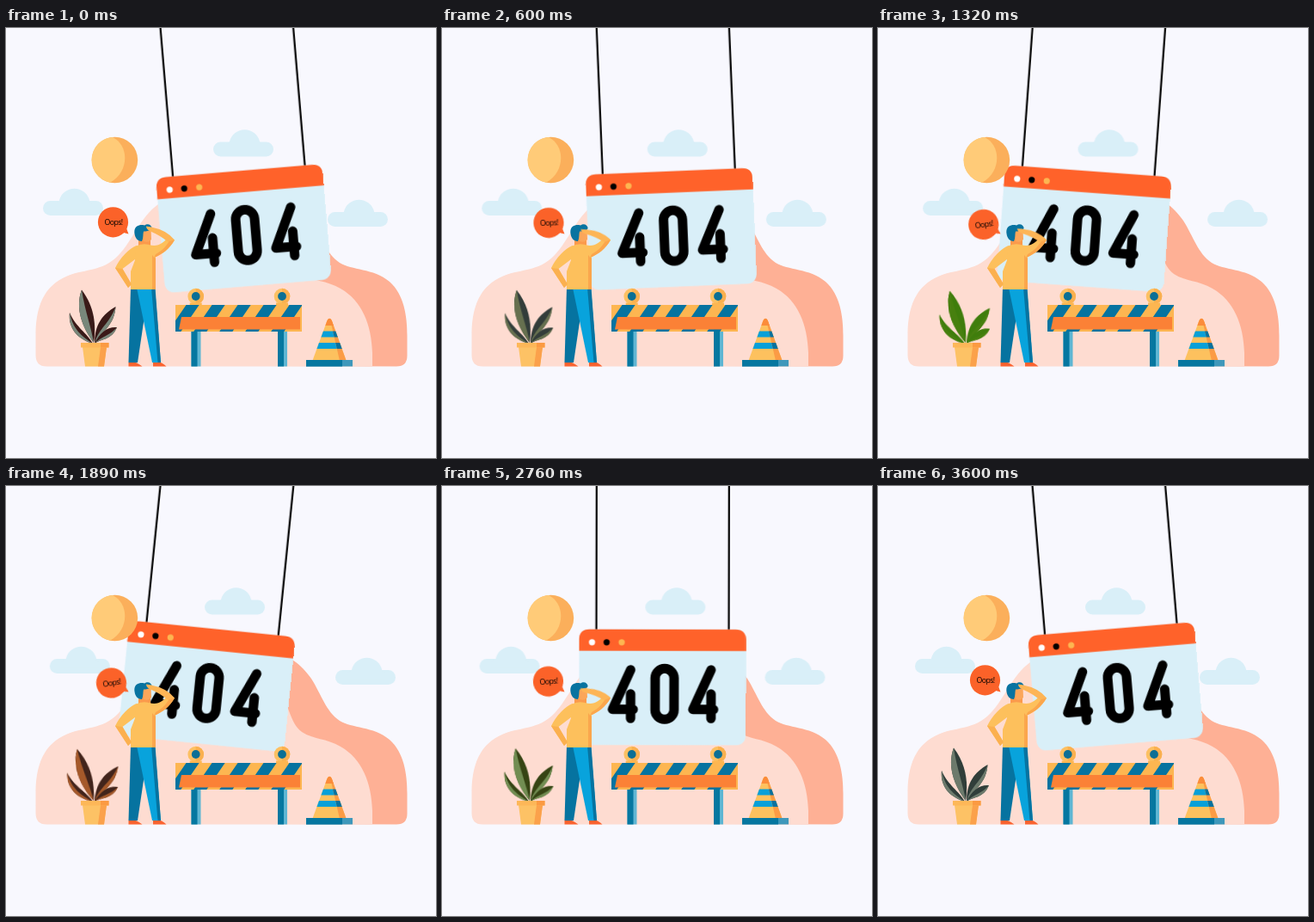
Write an HTML page that moves like this. It is 500x500 px and loops after 3.63 s.

```html
<!DOCTYPE html>
<html lang="en">
<head>
<meta charset="utf-8">
<title>404</title>
<style>
  html, body { margin: 0; height: 100%; overflow: hidden; background: #f8f8fe; }
  svg { display: block; width: 100%; height: 100%; }

  .sway { animation: 1815ms ease-in-out infinite alternate; }
  .sign { animation-name: swing; transform-origin: 256.8px 0; }
  .bubble { animation-name: tilt; transform-origin: 142px 239px; }
  .cloud-a { animation-name: drift; }
  .leaf-l { animation-name: lean-l; transform-origin: 102px 366px; }
  .leaf-r { animation-name: lean-r; transform-origin: 102px 366px; }
  .cloud-b { animation: drift-b 3630ms ease-in-out infinite; }
  .cloud-c { animation: drift-c 3630ms ease-in-out infinite; }
  .forearm { animation: salute 907.5ms ease-in-out infinite alternate; transform-origin: 192px 246px; }
  .plant { animation: tint 3630ms linear infinite; }

  @keyframes swing { from { transform: rotate(-4.8deg); } to { transform: rotate(5.8deg); } }
  @keyframes tilt { to { transform: rotate(-10deg); } }
  @keyframes drift { to { transform: translateX(-10px); } }
  @keyframes lean-l { to { transform: rotate(-5deg); } }
  @keyframes lean-r { to { transform: rotate(4deg); } }
  @keyframes drift-b { 40% { transform: translateX(9.3px); } 84%, 100% { transform: none; } }
  @keyframes drift-c { 44% { transform: translateX(9.7px); } 88%, 100% { transform: none; } }
  @keyframes salute { to { transform: rotate(-9deg); } }
  @keyframes tint {
    0% { color: #78877a; fill: #3a1a18; }
    16.5% { color: #66704f; fill: #333d3a; }
    36.4% { color: #47800f; fill: #3f7d0c; }
    52% { color: #a5592a; fill: #42241b; }
    66% { color: #6d9a38; fill: #2c6d10; }
    86% { color: #74806c; fill: #401c18; }
    99%, 100% { color: #6c7a6c; fill: #303e3a; }
  }
  .half { fill: currentColor; }
  .digits { fill: none; stroke: #000; stroke-width: 11; stroke-linecap: round; stroke-linejoin: round; }
  .bubble text { font: 8.8px "Open Sans", sans-serif; letter-spacing: -.6px; text-anchor: middle; }
</style>
</head>
<body>
<svg viewBox="0 0 500 500">
  <defs>
    <g id="cloud" fill="#d9eff8">
      <rect y="15.5" width="70" height="17" rx="8.5"/>
      <path d="M14 18Q19 16 19 15A18 18 0 0 1 54 15Q54 17 57 18V26H14Z"/>
    </g>
    <path id="four" d="M21 0L0 46H24M21 28V56.500"/>
    <g id="lamp">
      <circle r="9.3" fill="#fdc062"/>
      <path d="M0 -9.3A9.3 9.3 0 0 1 0 9.3Z" fill="#fbb04f"/>
      <circle r="4.9" fill="#0b6f95"/>
      <path d="M-7 7.5H7V10.5H-7Z" fill="#fdb651"/>
    </g>
    <g id="leg">
      <path d="M0 350H11V393.500H0Z" fill="#5fb6d3"/>
      <path d="M0 350H7V393.500H0Z" fill="#0677a0"/>
    </g>
    <clipPath id="plank"><path d="M197 322H344V353H197Z"/></clipPath>
    <clipPath id="cone"><path d="M356.500 386.500L373.500 340Q376 335.500 378.700 340L395.500 386.500Z"/></clipPath>
  </defs>

  <path fill="#feb095" d="M300 393V196C322 190 342 205 355 224C367 243 372 262 388 273C402 282 427 279 446 295C463 310 466.500 335 466.500 358V381Q466.500 393.500 454 393.500Z"/>
  <path fill="#fedcd1" d="M47 393.500Q34.500 393.500 34.500 380V355C35 318 48 296 76 286.500C98 280 115 281 131 264C148 246 156 220 177 205C205 188 285 195 315 232C329 250 329 275 344 286C358 295 372 293 389 303C414 317 425 345 426 378V393.500Z"/>

  <g class="sway cloud-a"><use href="#cloud" x="241" y="117"/></g>
  <g class="cloud-b"><use href="#cloud" x="43" y="185.500"/></g>
  <g class="cloud-c"><use href="#cloud" x="374" y="198.500"/></g>

  <g class="sway sign">
    <g transform="translate(.8 .8)">
      <path d="M179 -30V168M333 -30V168" stroke="#000" stroke-width="2.200"/>
      <rect x="159" y="166" width="194" height="134.500" rx="11" fill="#d9eff8"/>
      <path d="M159 191V178Q159 166 171 166H341Q353 166 353 178V191Z" fill="#ff622a"/>
      <circle cx="174" cy="181" r="3.600" fill="#fff"/>
      <circle cx="191" cy="181" r="3.600"/>
      <circle cx="208.500" cy="181" r="3.600" fill="#fdb651"/>
      <g class="digits">
        <use href="#four" x="198" y="213"/>
        <rect x="247.500" y="211.500" width="22" height="59" rx="11"/>
        <use href="#four" x="291.500" y="213"/>
      </g>
    </g>
  </g>

  <circle cx="126.500" cy="153.500" r="26.700" fill="#fbaf5b"/>
  <path d="M124 126.900C143 136 144 167 121 179.700A26.700 26.700 0 0 1 124 126.900Z" fill="#ffcb78"/>

  <g class="sway bubble">
    <path d="M133 237L142.500 239.500L139 230Z" fill="#fb6229"/>
    <circle cx="124.500" cy="225.800" r="17.600" fill="#fb6229"/>
    <text x="125" y="229">Oops!</text>
  </g>

  <!-- barrier -->
  <use href="#leg" x="215.500"/>
  <use href="#leg" x="316"/>
  <use href="#lamp" x="220.700" y="312"/>
  <use href="#lamp" x="321" y="312"/>
  <g clip-path="url(#plank)">
    <path d="M197 322H344V353H197Z" fill="#fdb651"/>
    <path d="M193 357L220.500 317M223 357L250.500 317M253 357L280.500 317M283 357L310.500 317M313 357L340.500 317" stroke="#0673a0" stroke-width="12.500"/>
  </g>
  <path d="M204 336H342V350.500H201Z" fill="#fb8136"/>

  <!-- cone -->
  <g clip-path="url(#cone)">
    <path d="M350 335H400V387H350Z" fill="#fdc15e"/>
    <path d="M350 352.500H400V359.500H350ZM350 366H400V373H350Z" fill="#08a0d8"/>
    <path d="M376 335L388 387H400V335Z" fill="#fb9b45"/>
    <path d="M380 352.500H400V359.500H381.700ZM383.200 366H400V373H384.800Z" fill="#0672a0"/>
    <path d="M370 335H383V346H370Z" fill="#fb8c3a"/>
  </g>
  <path d="M349 386H403V393.500H349Z" fill="#3f98bb"/>
  <path d="M349 386H391V393.500H349Z" fill="#0677a0"/>

  <!-- plant -->
  <g class="plant">
    <g class="sway leaf-l">
      <path d="M74 331C72 350 84 362 101 367C94 354 82 349 74 331Z"/>
      <path class="half" d="M74 331C72 350 84 362 101 367C88 358 78 351 74 331Z"/>
      <path d="M88 304.500C80 326 89 349 102 366C105 346 103 324 88 304.500Z"/>
      <path class="half" d="M88 304.500C80 326 89 349 102 366C99 347 92 330 88 304.500Z"/>
    </g>
    <g class="sway leaf-r">
      <path d="M127.500 324C112 333 103 345 103 367C112 352 126 346 127.500 324Z"/>
      <path class="half" d="M127.500 324C126 346 112 352 103 367C107 350 121 343 127.500 324Z"/>
      <path d="M129 348C118 347 109 354 103 367C111 361 123 363 129 348Z"/>
      <path class="half" d="M129 348C123 363 111 361 103 367C111 358 121 358 129 348Z"/>
    </g>
  </g>
  <path d="M89 371H117L114 393.500H92Z" fill="#fdc265"/>
  <path d="M110 371H117L114 393.500H107Z" fill="#fba14b"/>
  <path d="M87 366H119.500V371.500H87Z" fill="#fdb758"/>
  <path d="M110 366H119.500V371.500H110Z" fill="#fb9a42"/>

  <!-- person -->
  <path d="M142.500 393.500V389Q149 386 158.500 393.500ZM171 393.500V389Q179 386 186.500 393.500Z" fill="#fb6330"/>
  <path d="M145 302H166L153 389H142.500Z" fill="#0673a0"/>
  <path d="M152 302H173L180 389H170Z" fill="#08a3dc"/>
  <path d="M169 302H173.500L180 389H176.500Z" fill="#0673a0"/>
  <path d="M154 243H168V253Q161 258 154 253Z" fill="#fb9a4c"/>
  <path d="M157 234H168.500L169 246Q166 250 160 248Z" fill="#fba65a"/>
  <path d="M149.500 239C148 230 156 228 161 229.500C165 226.500 169 229 169.500 232C170 235 165 236 160 236.500C159 240 160 244 158 248C153 248 150 244 149.500 239Z" fill="#0873a0"/>
  <path d="M150 254Q160 249 169 253L174 262V304H145V283L150 270Z" fill="#fdc05c"/>
  <path d="M170 264L174 268V304H170Z" fill="#fba64c"/>
  <path d="M152 253C143 256 133 267 127 279L142 302L146 298L135.500 280L150 269Z" fill="#fdc05c"/>
  <path d="M127 279L142 302L146 298L135.500 280Z" fill="#fbb04f"/>
  <path d="M166 252C176 255 183 251 189 242L196 246.500C190 257 182 263 172 267Z" fill="#fdc05c"/>
  <path d="M196 246.500C190 257 182 263 172 267L174 263C182 259 188 252 191 245Z" fill="#fba64c"/>
  <path class="forearm" d="M196 246.500Q187 235 169 231.500L163 230.500Q163 234 168 236.500Q179 241 188 248.500Z" fill="#fdb556"/>
</svg>
</body>
</html>
```
